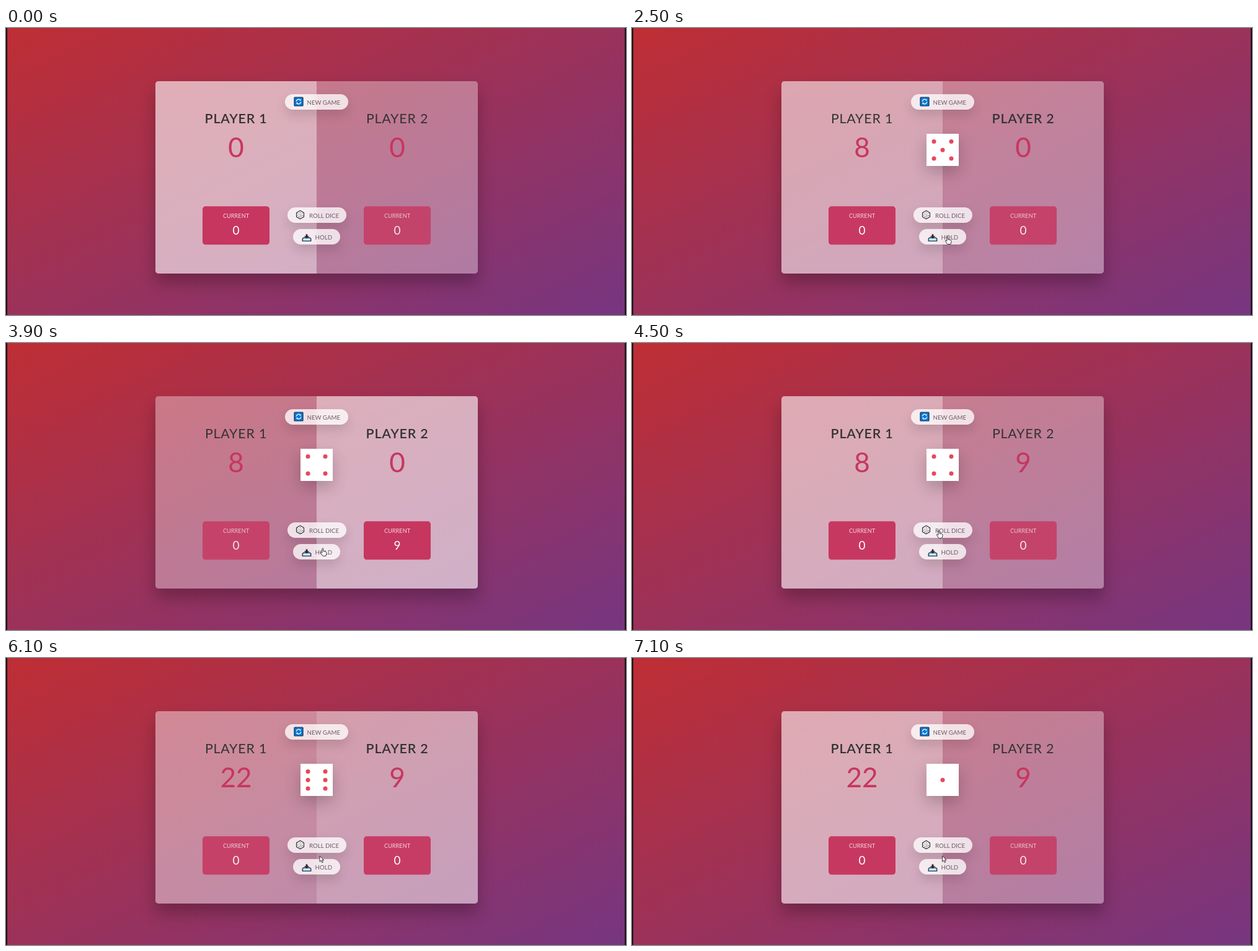
These frames come from a looping animation (1000x464 px, 7.2 s). An HTML page:

```html
<!DOCTYPE html>
<html lang="en">
<head>
<meta charset="utf-8">
<title>Dice game</title>
<style>
  html, body { margin: 0; width: 100%; height: 100%; overflow: hidden; background: #180f18; }
  #stage { position: relative; width: 1000px; height: 464px; overflow: hidden; }
  #stage div { position: absolute; box-sizing: border-box; }
  #page { left: 2px; top: 0; width: 996px; height: 483px;
    background: linear-gradient(to top left, #753682, #bf2e34); }
  #board, #shade { left: 241px; top: 85.5px; width: 520px; height: 311.5px; border-radius: 4.7px; }
  #board { overflow: hidden; background: rgba(255,255,255,.35); }
  #shade { box-shadow: 0 15.6px 26px rgba(0,0,0,.25); }
  .half { top: 0; width: 260px; height: 312px; background: #fff; }
  .button { height: 25px; border-radius: 13px; background: rgba(255,255,255,.77);
    backdrop-filter: blur(5px); box-shadow: 0 9px 18px rgba(0,0,0,.13); }
  #die { left: 475px; top: 171px; width: 52px; height: 52px; background: #fff;
    box-shadow: 0 10px 26px rgba(0,0,0,.22); }
  svg { position: absolute; left: 0; top: 0; }
  text { font-family: Lato, "Open Sans", sans-serif; fill: #333; }
  .name { font-size: 21.4px; letter-spacing: .8px; text-anchor: middle; }
  .score { font-size: 44px; fill: #c7365f; text-anchor: middle; }
  .label { font-size: 9.2px; fill: #fff; fill-opacity: .8; text-anchor: middle; }
  .current { font-size: 19px; fill: #fff; text-anchor: middle; }
  .caption { font-size: 9.7px; fill: #6a5d66; }
</style>
</head>
<body>
<div id="stage">
  <div id="page"></div>
  <div id="shade"></div>
  <div id="board">
    <div class="half" style="left:0"></div>
    <div class="half" style="left:260px"></div>
  </div>
  <div id="buttons"></div>
  <div id="die"></div>
  <svg width="1000" height="464" viewBox="0 0 1000 464">
    <g id="players"></g>
    <g id="captions"></g>
    <g id="refresh" transform="translate(472 119)" fill="none" stroke="#fff" stroke-width="1.3">
      <rect x="-7" y="-7" width="14" height="14" rx="1" fill="#0878d4" stroke="#12304f" stroke-width="1.2"/>
      <path d="M-3.7-.4A3.7 3.7 0 0 1 2.8-2.5M3.7.4A3.7 3.7 0 0 1-2.8 2.5"/>
      <path d="M3.6-4v2.6H1zM-3.6 4V1.4H-1z" fill="#fff" stroke="none"/>
    </g>
    <g id="cube" transform="translate(474.5 302)" fill="#f8f4f6" stroke="#2c262b" stroke-width="1.1" stroke-linejoin="round">
      <path d="M0-6.7 6-3.3V3.3L0 6.7-6 3.3V-3.3Z"/>
      <path d="M-6-3.3 0 0 6-3.3M0 0V6.7" fill="none" stroke-width=".6" stroke="#777"/>
      <path d="M-.5-3.4h1M-4 .3v1M-2 2.6v1M2 1.4v1M4 1v1" stroke-width="1.3"/>
    </g>
    <g id="tray" transform="translate(485 339.5)">
      <path d="M-6.8 1-4.8-.6h9.6L6.8 1v4H-6.8Z" fill="#8fd0f2" stroke="#252b38" stroke-width="1.2"/>
      <path d="M-5 2.6H5" stroke="#e6f6ff" stroke-width="1.4"/>
      <path d="M-1.4-6h2.8v3h2.8L0 .8-4.2-3h2.8Z" fill="#33202b"/>
    </g>
    <g id="pips" fill="#e8485a"></g>
    <g id="cursor" fill="#fff" stroke="#222" stroke-width=".9" stroke-linejoin="round">
      <path id="arrow" d="M0 0V9.2L2.1 7.3 3.7 10.7 5.3 10 3.8 6.7H6.6Z"/>
      <path id="hand" d="M-1 .8Q0-.7 1 .8V5L4.5 5.7Q6.4 6.1 6 8.5L5 12.6H0L-3.6 7.6Q-3.8 5.8-2.2 6.5L-1 7.6Z"/>
    </g>
  </svg>
</div>
<script>
const LOOP = 7200, FRAME = 100, FADE = 750, GLIDE = 400;
const ROLL_Y = 303, HOLD_Y = 337;
const $ = id => document.getElementById(id);
const all = selector => [...document.querySelectorAll(selector)];
const clamp = x => Math.min(1, Math.max(0, x));
const smooth = x => x * x * (3 - 2 * x);

const buttons = [
  { y: 106.5, w: 102, text: "NEW GAME" },
  { y: 289.5, w: 95, text: "ROLL DICE" },
  { y: 325, w: 76, text: "HOLD" }
].map(b => ({ ...b, x: 501 - b.w / 2 }));

// Players alternate: each rolls a few times, moves to the other button and holds.
const rounds = [
  { first: 700, gap: 400, rolls: [3, 5], leave: 1200, hold: 2400, rollX: 504, holdX: 509 },
  { first: 3100, gap: 400, rolls: [5, 4], leave: 3600, hold: 4000, rollX: 505, holdX: 512 },
  { first: 4600, gap: 350, rolls: [3, 5, 6], leave: 5400, hold: 5800, rollX: 495, holdX: 508 },
  { first: 6600, gap: 0, rolls: [1], leave: 6900, rollX: 504, holdX: 497 }
];

// Plays the game up to time t.
function play(t) {
  const game = { active: 0, die: 0, points: 0, scores: [0, 0], changed: -FADE };
  const pass = at => {
    game.active = 1 - game.active;
    game.points = 0;
    game.changed = at;
  };
  for (const { first, gap, rolls, hold } of rounds) {
    rolls.forEach((roll, i) => {
      const at = first + gap * i;
      if (at > t) return;
      game.die = roll;
      if (roll === 1) pass(at);
      else game.points += roll;
    });
    if (hold <= t) {
      game.scores[game.active] += game.points;
      pass(hold);
    }
  }
  return game;
}

const entry = { at: 200, x: 540, y: 462 };
const glides = rounds.flatMap((round, i) => [
  { at: i ? rounds[i - 1].hold + 100 : entry.at, x: round.rollX, y: ROLL_Y },
  { at: round.leave, x: round.holdX, y: HOLD_Y }
]);

function drawCursor(t) {
  let { x, y } = entry;
  for (const goal of glides) {
    const k = smooth(clamp((t - goal.at) / GLIDE));
    x += (goal.x - x) * k;
    y += (goal.y - y) * k;
  }
  const over = buttons.some(b => x > b.x && x < b.x + b.w && y > b.y && y < b.y + 25);
  $("cursor").style.display = t < entry.at ? "none" : "";
  $("cursor").setAttribute("transform", `translate(${x} ${y})`);
  $("hand").style.display = over ? "" : "none";
  $("arrow").style.display = over ? "none" : "";
}

// Equivalent of the CSS "ease" curve
function ease(x) {
  const bezier = (a, b, s) => 3 * a * s * (1 - s) ** 2 + 3 * b * s * s * (1 - s) + s ** 3;
  let lo = 0, hi = 1;
  for (let i = 0; i < 20; i++) {
    const mid = (lo + hi) / 2;
    if (bezier(.25, .25, mid) < x) lo = mid; else hi = mid;
  }
  return bezier(.1, 1, lo);
}

function drawPips(die) {
  let pips = "";
  for (let row = -1; row <= 1; row++) {
    for (let col = -1; col <= 1; col++) {
      const shown = row === 0
        ? (col === 0 ? die % 2 === 1 : die === 6)
        : col !== 0 && (row === col ? die > 1 : die > 3);
      if (shown) pips += `<circle cx="${501 + 14 * col}" cy="${197.2 + 13.8 * row}" r="3.5"/>`;
    }
  }
  $("pips").innerHTML = pips;
  $("die").style.display = die ? "" : "none";
}

$("buttons").innerHTML = buttons.map(b =>
  `<div class="button" style="left:${b.x}px;top:${b.y}px;width:${b.w}px"></div>`).join("");
$("captions").innerHTML = buttons.map(b =>
  `<text class="caption" x="${b.x + 35.5}" y="${b.y + 17.2}">${b.text}</text>`).join("");
$("players").innerHTML = [371, 631].map((x, i) => `
  <text class="name" x="${x}" y="153.5">PLAYER ${i + 1}</text>
  <text class="score" x="${x}" y="208.5"></text>
  <g class="box">
    <rect x="${x - 54}" y="288.3" width="108" height="62" rx="4.7" fill="#c7365f"/>
    <text class="label" x="${x}" y="307.2">CURRENT</text>
    <text class="current" x="${x}" y="334.3"></text>
  </g>`).join("");

const halves = all(".half"), names = all(".name"), scores = all(".score");
const boxes = all(".box"), currents = all(".current");

function render(t) {
  const game = play(t);
  const progress = ease(clamp((t - game.changed) / FADE));
  game.scores.forEach((score, i) => {
    const isActive = i === game.active;
    const light = isActive ? progress : 1 - progress;
    halves[i].style.opacity = .4 * light;
    boxes[i].style.opacity = .8 + .2 * light;
    names[i].style.fontWeight = isActive ? 600 : 400;
    scores[i].textContent = score;
    currents[i].textContent = isActive ? game.points : 0;
  });
  drawPips(game.die);
  drawCursor(t);
}

const start = performance.now();
function tick() {
  const t = (performance.now() - start) % LOOP;
  render(Math.floor(t / FRAME) * FRAME);
  requestAnimationFrame(tick);
}
tick();
</script>
</body>
</html>
```
